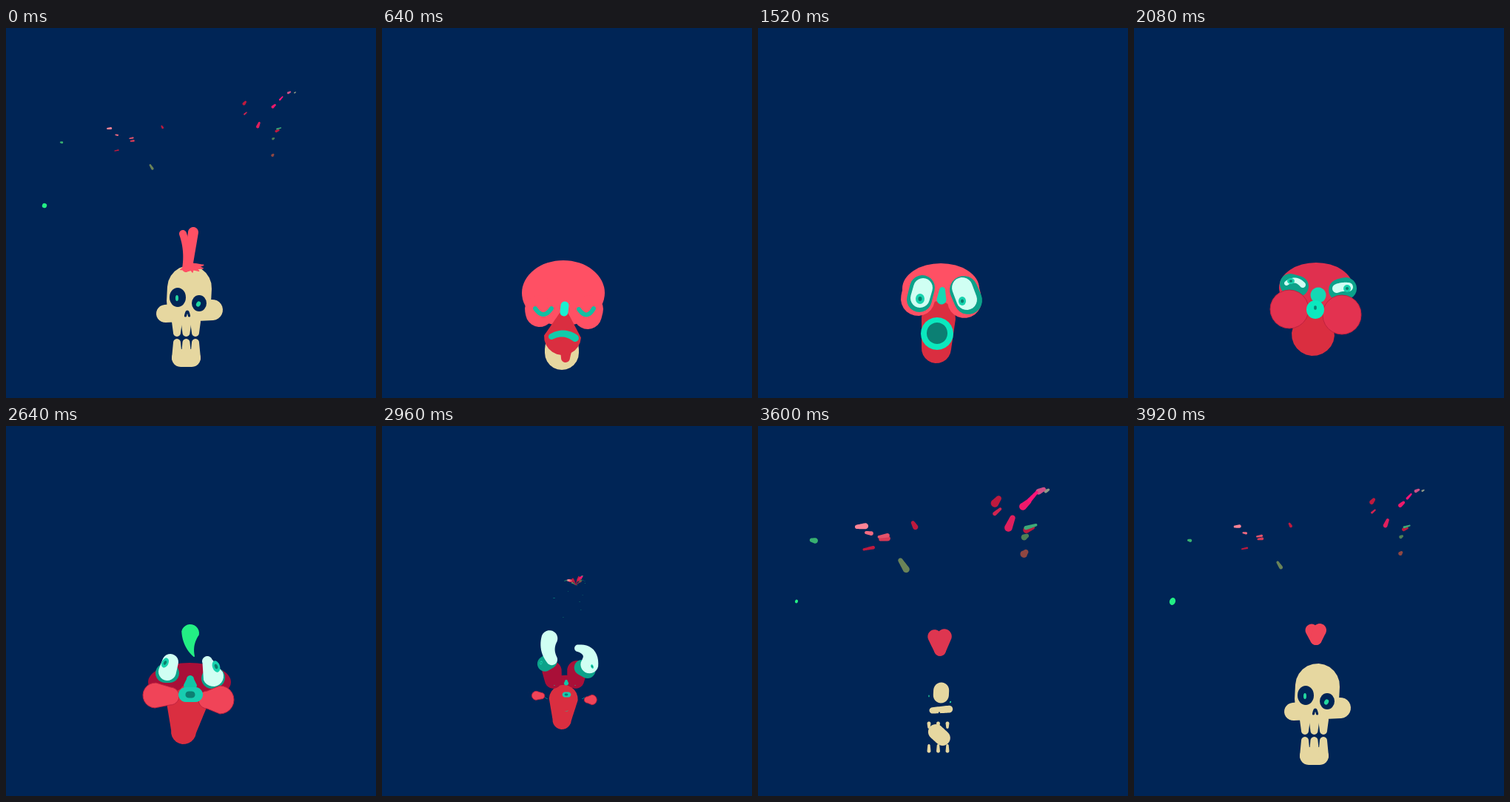
An HTML page for the animation above (4000 ms loop, 500 px wide and 500 px high).

```html
<!DOCTYPE html>
<html>
<head>
<meta charset="utf-8">
<style>
html, body { margin: 0; width: 100%; height: 100%; overflow: hidden; background: #002556; }
svg { display: block; width: 100%; height: 100%; }
</style>
</head>
<body>
<svg id="stage" viewBox="0 0 500 500"></svg>
<script>
const LOOP = 4000, STEP = 80;
const NAVY = '#002556', BONE = '#e6d7a0', PINK = '#ff5064', RED = '#da2e40', CRIMSON = '#be1a3e',
  WINE = '#a90f38', TEAL = '#0ca28a', MINT = '#0be8be', PALE = '#d0fff3', DEEP = '#0c7f73', LEAF = '#23ee84';

// Each pose: starts to grow, reached, held until, gone.
const POSE = {
  drip: [0, 240, 240, 640],
  shut: [320, 640, 1200, 1360],
  stare: [1200, 1360, 1760, 1920],
  puff: [1680, 1920, 2320, 2640],
  spit: [2400, 2640, 2720, 3120],
  fly: [2720, 2800, 2800, 2960],
  bloom: [2880, 3280, 3280, 3520],
  heart: [3440, 3760, 3920, 4000],
  skull: [3440, 3840, 4240, 4640],
  splat: [3920, 4000, 4000, 4240]
};

const stage = document.getElementById('stage');
const tracks = [];
const lerp = (a, b, p) => a.map((v, i) => v + (b[i] - v) * p);
const ease = p => p * p * (3 - 2 * p);
const rgb = c => [1, 3, 5].map(i => parseInt(c.substr(i, 2), 16));
let seed = 11;
const rand = (lo, hi) => {
  seed = (seed * 16807) % 2147483647;
  return lo + (hi - lo) * seed / 2147483647;
};

// Oval: x y rx ry [turn]
function oval([x, y, rx, ry, turn = 0]) {
  return { d: `M${-rx} 0a${rx} ${ry} 0 1 1 ${2 * rx} 0a${rx} ${ry} 0 1 1 ${-2 * rx} 0Z`, move: `translate(${x} ${y}) rotate(${turn})` };
}

// Limb: a round-ended, tapering, bent bar: x1 y1 x2 y2 r1 r2 bend
function limb([x1, y1, x2, y2, r1, r2, bend = 0]) {
  const dx = x2 - x1, dy = y2 - y1, len = Math.hypot(dx, dy) || 1, N = 12;
  const cx = (x1 + x2) / 2 - dy / len * bend * 2, cy = (y1 + y2) / 2 + dx / len * bend * 2;
  const pts = [];
  const edge = (t, turn) => {
    const s = 1 - t, r = r1 + (r2 - r1) * t;
    const a = Math.atan2(s * (cy - y1) + t * (y2 - cy), s * (cx - x1) + t * (x2 - cx)) + turn;
    pts.push((s * s * x1 + 2 * s * t * cx + t * t * x2 + r * Math.cos(a)).toFixed(2) + ' ' +
      (s * s * y1 + 2 * s * t * cy + t * t * y2 + r * Math.sin(a)).toFixed(2));
  };
  const quarter = Math.PI / 2;
  for (let i = 0; i <= N; i++) edge(i / N, -quarter);
  for (let i = 1; i < N; i++) edge(1, -quarter + Math.PI * i / N);
  for (let i = N; i >= 0; i--) edge(i / N, quarter);
  for (let i = 1; i < N; i++) edge(0, quarter + Math.PI * i / N);
  return { d: 'M' + pts.join('L') + 'Z', move: '' };
}

function shrink(v) {
  if (v.length < 6) return [v[0], v[1], 0, 0, v[4] || 0].slice(0, v.length);
  const x = (v[0] + v[2]) / 2, y = (v[1] + v[3]) / 2;
  return [x, y, x, y, 0, 0, 0];
}

function track(keys) {
  const el = document.createElementNS('http://www.w3.org/2000/svg', 'path');
  stage.appendChild(el);
  tracks.push({ el, keys });
  return el;
}

// Moves one shape through the poses in order; a pose may begin with a new colour.
function part(color, poses, grow = 1) {
  const keys = [], names = Object.keys(poses);
  let c = rgb(color), shift = 0, before = 0, v;
  for (const name of names) {
    const [enter, from, to] = POSE[name], words = String(poses[name]).split(/[ ,]+/);
    if (words[0][0] === '#') c = rgb(words.shift());
    v = words.map(Number);
    if (v.length < 6) {
      v[2] *= grow;
      v[3] *= grow;
      v[4] = v[4] || 0;
    }
    if (from < before) shift = LOOP;
    before = from;
    if (!keys.length) keys.push({ t: enter, v: shrink(v), c });
    keys.push({ t: from + shift, v, c });
    if (to > from) keys.push({ t: to + shift, v, c });
  }
  if (poses.shut && poses.splat) {
    keys.shift();
    keys.push({ ...keys[0], t: keys[0].t + LOOP });
  } else {
    keys.push({ t: POSE[names[names.length - 1]][3] + shift, v: shrink(v), c });
  }
  return track(keys);
}

// Skull
part(BONE, { skull: '248 351 247 370 30 30 0' });
part(BONE, { skull: '215 386 279 381 12 14 0' });
part(BONE, { bloom: '247 363 247 384 8 8 0', skull: '236 446 251 446 12 12 0', shut: '243 434 243 439 23 23 0' });
for (let x = 231; x < 260; x += 12.5) {
  part(BONE, { skull: [x, 397, x, 412, 7, 5, 0] });
  part(BONE, { skull: [x, 446, x, 425, 7, 5, 0] });
}
part(NAVY, { skull: '232 364 11 13' });
part(NAVY, { skull: '261 372 10 11' });
part('#22d7a0', { skull: '231 365 2 4' });
part('#22d7a0', { skull: '260 373 2.8 3.8 30' });
part(NAVY, { skull: '242.5 389 247.5 389 1.6 1.6 -6' });

// Head
part(PINK, { drip: '247 334 33 18', shut: '245 358 56 44', stare: '247 352 52 34', puff: '#e0304f 246 351 50 34', spit: WINE + ' 248 346 56 26' });
part(RED, { shut: '246 384 244 417 5 25 0', stare: '244 392 241 433 23 20 0', puff: '244 385 242 414 24 29 0',
  spit: '244 378 240 413 27 17 0', bloom: '247 356 248 373 8 6 0' });
part(RED, { shut: '249 428 248 446 9 6 0' });
part(PINK, { shut: '212 380 213 385 19 19 0', stare: '217 361 216 366 23 23 0', puff: '#e0304f 218 365 218 367 20 20 0',
  spit: WINE + ' 222 342 226 345 14 14 0', bloom: '246 345 235 309 8 12 0', heart: '#f04458 246 288 240 276 8 8.5 0', splat: PINK + ' 243 325 239 278 5 5 3' });
part(PINK, { shut: '280 380 278 388 19 19 0', stare: '278 361 279 369 23 23 0', puff: '#e0304f 274 365 274 367 20 20 0',
  spit: WINE + ' 272 342 270 345 14 14 0', bloom: '246 345 254 308 8 13 0', heart: '#f04458 246 288 251 276 8 9 0', splat: PINK + ' 246 323 253 276 6 7 0' });
for (let a = -.2; a < 3; a += .55)
  part(PINK, { splat: [250, 322, 250 + 17 * Math.cos(a), 322 + 8 * Math.sin(a), 5, .8, 0] });

// Eyes
function eye(rim, white, iris) {
  part('#12bfa2', rim);
  part(PALE, white);
  part('#17d3ae', iris);
  part('#0b7e6c', iris, .42);
}
eye({ shut: '207 379 229 379 3 3 8', stare: `${TEAL} 222 351 218 367 17 17 0`, puff: '211 346 222 349 14 14 0', spit: '215 334 221 334 13 13 0', bloom: '228 302 234 292 6 7 0' },
  { stare: '223 351 219 365 13 13 0', puff: '206 345 228 347 3 4 -5', spit: '222 319 218 332 11 12 0', bloom: '233 238 247 290 11 1 9' },
  { stare: '219 366 6 7', puff: '212 342 5 4', spit: '215 320 4.5 7 25' });
eye({ shut: '266 380 286 379 3 3 8', stare: `${TEAL} 278 354 284 368 19 19 0`, puff: '278 354 286 352 15 15 0', spit: '278 341 282 340 14 14 0', bloom: '258 304 271 315 5 6 0' },
  { stare: '276 351 282 367 14 14 0', puff: '274 352 290 350 6 6 -1', spit: '272 318 280 338 7 14 0', bloom: '254 273 281 298 1.5 9 -19' },
  { stare: '276 369 5 6', puff: '288 352 5 5', spit: '284 325 5 8 -20' });

// Cheeks
for (const poses of [
  { puff: '210 380 210 380 26 26 0', spit: '#f04458 202 364 222 365 17 12 0' },
  { puff: '281 387 281 388 26 26 0', spit: '#f04458 289 370 272 370 19 12 0' }
]) part('#e33250', poses).setAttribute('stroke', '#c0223f');

// Nose and mouth
part('#19f0d0', { shut: '247 375 246 384 5.5 5.5 0', stare: '#15d8b4 249 354 248 367 4 6.5 0', puff: '249 361 249 361 10.5 10.5 0', spit: '#12c5a5 249 342 249 350 5 9 0' });
part('#12cbaa', { shut: '229 417 261 419 4 5 -5', stare: MINT + ' 242 413 242 413 22 22 0', puff: '245 380 245 381 12 12 0', spit: '#18cdb0 243 363 256 363 10 10 0' });
part(DEEP, { stare: '242 412 242 413 14 14 0', puff: '245 377 245 379 1.8 1.8 0', spit: '247 363 251 363 4.5 4.5 0' });

// Seed
part(LEAF, { spit: '249 280 254 311 12 1 3', fly: '257 222 261 258 10 1 4' });

// A petal grows from the hub, spreads, shrinks to a drifting shard at its tip and fades.
const HUB = { x: 262, y: 215 };
const spread = (x, y) => [HUB.x + (x - HUB.x) * (x < HUB.x ? 1.17 : 1.38), HUB.y + (y - HUB.y) * 1.05];
function petal(c, v, shard = true) {
  const [x1, y1, x2, y2, r1, r2, bend] = v;
  const seedling = [HUB.x, HUB.y, HUB.x, HUB.y, 0, 0, 0];
  const wide = [...spread(x1, y1), ...spread(x2, y2), r1, r2, bend];
  const [tx, ty] = spread(x2, y2), x = tx + rand(-12, 10), y = ty + rand(-14, 10);
  const a = Math.atan2(y2 - y1, x2 - x1) + rand(-.4, .4), r = shard ? rand(1.2, 3) : 0, h = shard ? rand(1, 4) : 0;
  const sliver = k => [x - h * k * Math.cos(a), y - h * k * Math.sin(a), x + h * k * Math.cos(a), y + h * k * Math.sin(a), r * k, r * k * .7, 0];
  const stops = [[2880, seedling], [3280, v], [3360, wide], [3600, sliver(1.8)], [3920, sliver(1)], [4000, sliver(.7)], [4160, sliver(0)]];
  track(stops.map(([t, s]) => ({ t, v: s, c })));
}

// Overlapping petals along a line, shading from one colour to another.
function spray(x1, y1, x2, y2, n, c1, c2, r) {
  const dx = (x2 - x1) / n, dy = (y2 - y1) / n;
  for (let i = 0; i < n; i++) {
    const x = x1 + dx * i, y = y1 + dy * i, off = i % 2 ? 3 : -3;
    petal(lerp(rgb(c1), rgb(c2), i / (n - 1)), [x - dy / 9 * off, y + off, x + dx * 1.2, y + dy * 1.2 + off, r - i, r - i - 1, 0]);
  }
}

// Left stem
petal(rgb(CRIMSON), [230, 168, 176, 171, 11, 6, 0]);
petal(rgb(CRIMSON), [261, 213, 221, 139, 3, 14, 2]);
spray(205, 158, 155, 150, 4, '#d83a56', '#ff8496', 14);
petal(rgb('#38b070'), [167, 154, 112, 162, 2, 2, 4]);
for (let x = 118; x < 140; x += 9) petal(rgb('#38b070'), [x + 8, 153, x, 161, 1.5, 1.5, 0], false);
petal(rgb('#6a8358'), [256, 216, 213, 184, 2, 10, 4]);
// Right stem
petal(rgb('#4f7f55'), [302, 165, 330, 156, 6, 10, 0]);
petal(rgb('#8e4742'), [268, 216, 327, 168, 2, 9, -6]);
petal(rgb(CRIMSON), [285, 158, 336, 134, 12, 5, 0]);
petal(rgb(CRIMSON), [265, 214, 301, 110, 3, 11, -5]);
petal(rgb('#8e9a86'), [337, 99, 351, 95, 6, 4, 0]);
petal(rgb('#cf5088'), [330, 109, 345, 104, 8, 6, 0]);
spray(294, 146, 340, 106, 4, '#d02450', '#ff1478', 13);
petal(rgb('#3daa78'), [331, 132, 339, 132, 2, 2, -2]);

// Sepals scattered round the hub and down the axis
for (let i = 0; i < 9; i++) {
  const x = HUB.x + rand(-12, 14) - i, y = HUB.y - 6 + i * i * .8, a = rand(-.6, .9);
  part(i % 2 ? '#16d58c' : LEAF, { bloom: [x, y, x + 7 * Math.cos(a), y + 7 * Math.sin(a), 1.8, 1.4, 1] });
}
part('#0ecb9f', { bloom: '223 235 242 230 2 2 -2' });

// Ribbons
for (const side of [-1, 1]) {
  const at = d => 247 + side * d;
  part(MINT, { bloom: [at(6), 354, at(22), 347, 1.8, 1.8, side * 2] });
  part(MINT, { bloom: [at(11), 375, at(39), 360, 2.2, 1.8, side * 4] });
  part('#d02444', { bloom: [at(49), 360, 1.4, 1.4] });
}
part('#10d3a0', { bloom: '232 388 267 382 2.2 2.2 3' });

// Stray drop
part(LEAF, { heart: '52 237 4 5 20', splat: '52 240 3.2 3.2 20' });

function draw(t) {
  for (const { el, keys } of tracks) {
    const u = [t, t + LOOP].find(x => x >= keys[0].t && x < keys[keys.length - 1].t);
    el.style.display = u === undefined ? 'none' : '';
    if (u === undefined) continue;
    const i = keys.findIndex(k => k.t > u), a = keys[i - 1], b = keys[i];
    const p = ease((u - a.t) / (b.t - a.t)), v = lerp(a.v, b.v, p);
    const { d, move } = v.length < 6 ? oval(v) : limb(v);
    el.setAttribute('d', d);
    el.setAttribute('transform', move);
    el.setAttribute('fill', `rgb(${lerp(a.c, b.c, p).map(Math.round)})`);
  }
}

const start = performance.now();
function tick() {
  const t = (performance.now() - start) % LOOP;
  draw(Math.floor(t / STEP) * STEP);
  requestAnimationFrame(tick);
}
tick();
</script>
</body>
</html>
```
